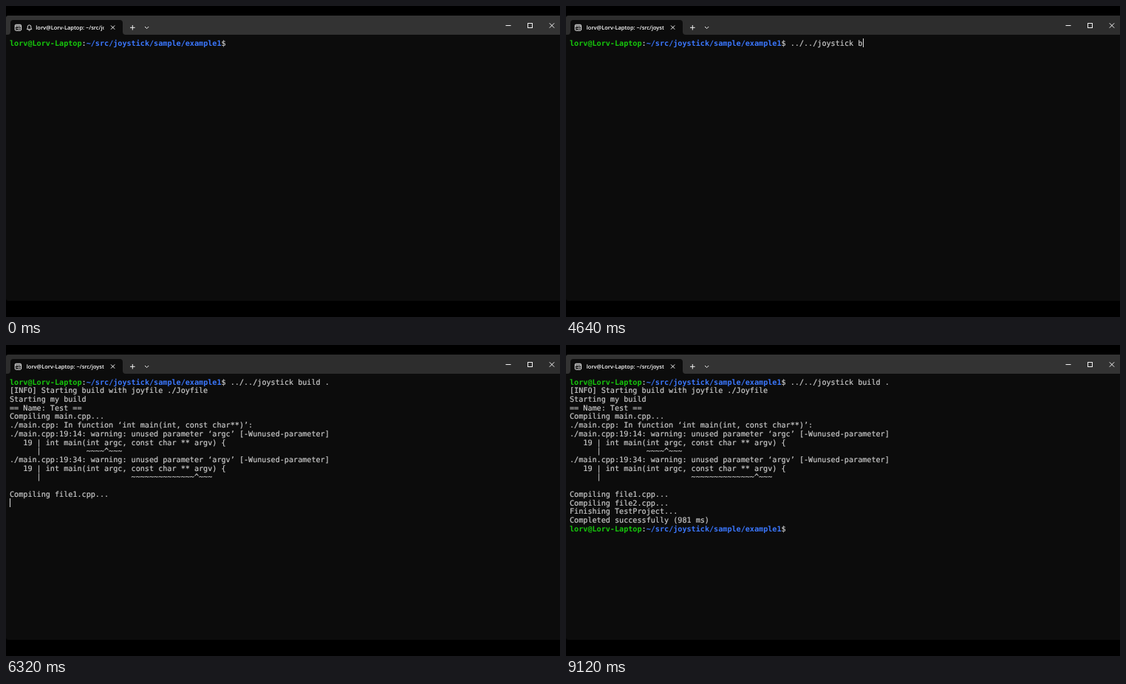
Animation, 750 px wide and 422 px high, one loop 9200 ms. Source, as an HTML page:

```html
<!DOCTYPE html>
<html lang="en">
<head>
<meta charset="utf-8">
<title>Terminal build</title>
<style>
  html, body { margin: 0; width: 100%; height: 100%; overflow: hidden; background: #000; }
  svg { display: block; width: 100%; height: 100%; }
  text { white-space: pre; text-rendering: geometricPrecision; }
  .mono { font: 10.14px "DejaVu Sans Mono", monospace; fill: #ccc; stroke: #ccc; stroke-width: .18; }
  .strong { font-weight: 700; stroke: none; }
  .user { fill: #16c60c; }
  .path { fill: #3b78ff; }
  .title { font: 600 7.45px "Open Sans", sans-serif; fill: #fff; }
  .icon { fill: none; stroke: #f2f2f2; stroke-width: 1; }
</style>
</head>
<body>
<svg viewBox="0 0 750 422">
  <clipPath id="titleClip"><rect x="24" y="20" width="108.6" height="18"/></clipPath>
  <rect width="750" height="422" fill="#000"/>
  <path id="bar" d="M0 40V16Q0 13 3 13H750V40Z"/>
  <path d="M0 39H2Q6 39 6 35V23Q6 19 10 19H154Q158 19 158 23V35Q158 39 162 39H750V400H3Q0 400 0 397Z" fill="#0c0c0c"/>

  <g class="icon">
    <rect x="12.3" y="25.3" width="8.2" height="8" rx="1.2"/>
    <path d="M12.3 27.2H20.5" stroke-width="1.2"/>
    <path d="M14 29.2L15.3 30.4L14 31.6M16.6 29.4H18.8V31.5H16.6Z" stroke-width=".7"/>
    <path id="bell" d="M28.4 31.6H34.8L33.9 30V28.2A2.3 2.3 0 0 0 29.3 28.2V30ZM30.6 32.4A1 1 0 0 0 32.6 32.4" stroke-width=".9"/>
    <path d="M142 26.5L147.2 31.7M147.2 26.5L142 31.7"/>
    <path d="M168 29.3H174.6M171.3 26V32.6"/>
    <path d="M188 28L190.6 30.6L193.2 28"/>
    <path d="M676.5 26.5H683.5"/>
    <rect x="706.5" y="23.5" width="6" height="6"/>
    <path d="M735.8 23.3L742.2 29.7M742.2 23.3L735.8 29.7"/>
  </g>
  <g clip-path="url(#titleClip)"><text id="title" class="title" y="32">lorv@Lorv-Laptop: ~/src/joystick/sample/example1</text></g>

  <g id="screen"></g>
  <rect id="cursor" width="1" height="12" fill="#d8d8d8"/>
</svg>
<script>
const LOOP = 9200, CELL = 6.104, LEFT = 5, TOP = 44, PITCH = 11.71, BASE = 53.6;
const PROMPT_CELLS = 49;
const $ = id => document.getElementById(id);

const prompt = '<tspan class="strong user">lorv@Lorv-Laptop</tspan>:' +
  '<tspan class="strong path">~/src/joystick/sample/example1</tspan>$ ';
const command = "../../joystick build .";

const output = [
  "[INFO] Starting build with joyfile ./Joyfile",
  "Starting my build",
  "== Name: Test ==",
  "Compiling main.cpp...",
  "./main.cpp: In function ‘int main(int, const char**)’:",
  "./main.cpp:19:14: warning: unused parameter ‘argc’ [-Wunused-parameter]",
  "   19 | int main(int argc, const char ** argv) {",
  "      |          ~~~~^~~~",
  "./main.cpp:19:34: warning: unused parameter ‘argv’ [-Wunused-parameter]",
  "   19 | int main(int argc, const char ** argv) {",
  "      |                    ~~~~~~~~~~~~~~^~~~",
  "",
  "Compiling file1.cpp...",
  "Compiling file2.cpp...",
  "Finishing TestProject...",
  "Completed successfully (981 ms)",
  prompt
];

// [time, characters typed]
const typing = [
  [0, 0], [1920, 1], [2080, 2], [2320, 3], [2480, 4], [2560, 5], [2800, 6],
  [3040, 7], [3120, 15], [4640, 16], [4720, 17], [4880, 18],
  [5120, 19], [5200, 20], [5280, 21], [5600, 22]
];
// [time, output lines shown]
const printing = [[0, 0], [6080, 4], [6320, 13], [6640, 14], [6800, 15], [7040, 17]];

const stepAt = (steps, t) => steps.filter(([start]) => start <= t).pop()[1];

const rows = [prompt + '<tspan id="typed"></tspan>', ...output].map((html, i) => {
  const row = document.createElementNS("http://www.w3.org/2000/svg", "text");
  row.setAttribute("class", "mono");
  row.setAttribute("x", LEFT);
  row.setAttribute("y", BASE + i * PITCH);
  row.innerHTML = html;
  $("screen").append(row);
  return row;
});

const show = (el, on) => el.setAttribute("visibility", on ? "visible" : "hidden");

function draw(t) {
  const typed = stepAt(typing, t), printed = stepAt(printing, t);
  const belled = t < 80;

  $("bar").setAttribute("fill", belled || t >= 6640 ? "#333" : "#2d2d2d");
  show($("bell"), belled);
  $("title").setAttribute("x", belled ? 40.3 : 27.8);

  $("typed").textContent = command.slice(0, typed);
  rows.forEach((row, i) => show(row, i <= printed));

  const atPrompt = printed === output.length;
  const column = atPrompt ? PROMPT_CELLS : printed ? 0 : PROMPT_CELLS + typed;
  const line = atPrompt ? printed : printed && printed + 1;
  $("cursor").setAttribute("x", Math.round(LEFT + column * CELL));
  $("cursor").setAttribute("y", Math.round(TOP + line * PITCH));
  show($("cursor"), !belled && t < 8240);
}

const begin = performance.now();
function tick() {
  draw((performance.now() - begin) % LOOP);
  requestAnimationFrame(tick);
}
tick();
</script>
</body>
</html>
```
